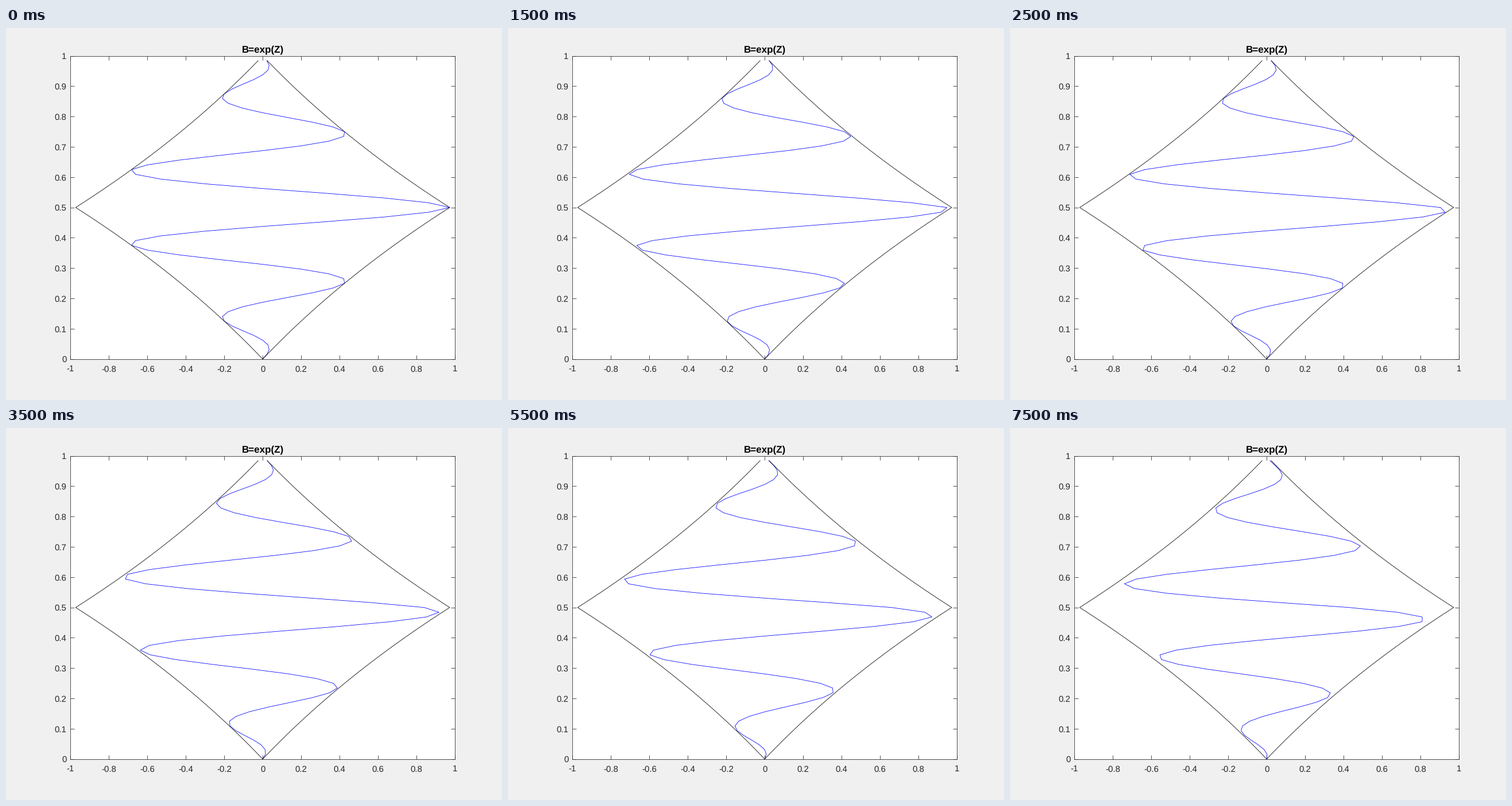
Write a matplotlib script that moves like this. It is 864 by 648 pixels and loops after 8000 ms.

```python
import numpy as np
import matplotlib.pyplot as plt
from matplotlib.animation import FuncAnimation

W, H, DPI = 864, 648, 100
AXES = (0.13, 0.11, 0.775, 0.815)  # left, bottom, width, height
STEPS, STEP_MS = 16, 500
PX = 72 / DPI  # points per pixel
THIN = 0.8 * PX
INK = "#262626"

plt.rcParams["font.family"] = "Liberation Sans"
plt.rcParams["text.hinting"] = "none"
plt.rcParams["text.hinting_factor"] = 1

fig = plt.figure(figsize=(W / DPI, H / DPI), dpi=DPI, facecolor="#f0f0f0")
ax = fig.add_axes(AXES)
ax.set(xlim=(-1, 1), ylim=(0, 1), facecolor="white")
xticks = np.arange(-5, 6) / 5
yticks = np.arange(11) / 10
ax.set_xticks(xticks)
ax.set_yticks(yticks)
ax.tick_params(direction="in", length=6.7 * PX, width=THIN, color=INK,
               top=True, right=True, labelleft=False, labelbottom=False)
for spine in ax.spines.values():
    spine.set(linewidth=THIN, color=INK)


def label(x, y, text, size=15.4, **style):
    """Write text with its baseline at pixel (x, y) from the top left."""
    fig.text(x / W, 1 - y / H, text, fontsize=size * PX, va="baseline", **style)


left, bottom, width, height = AXES[0] * W, (1 - AXES[1]) * H, AXES[2] * W, AXES[3] * H
middle = left + width / 2
for v in xticks:
    label(middle + v * width / 2, 598.4, f"{v:g}", ha="center", color=INK)
for v in yticks:
    label(105.7, bottom - v * height + 5.6, f"{v:g}", ha="right", color=INK)
label(middle, 42.2, "B=exp(Z)", 17, ha="center", color="black", weight="bold")

z = np.arange(64) / 64
envelope = 1.5 * (np.exp(np.minimum(z, 1 - z)) - 1)
wave, = ax.plot([], [], color="blue", lw=THIN, zorder=2)
for side in (-1, 1):
    ax.plot(side * envelope, z, color="black", lw=THIN, zorder=2.1)


def update(n):
    # travelling wave that fades slowly under the fixed envelope
    wave.set_data(envelope * np.cos(8 * np.pi * z + 0.0724 * n) * np.cos(0.0223 * n), z)
    return wave,


anim = FuncAnimation(fig, update, frames=STEPS, interval=STEP_MS,
                     repeat=True, repeat_delay=0)
plt.show()
```
